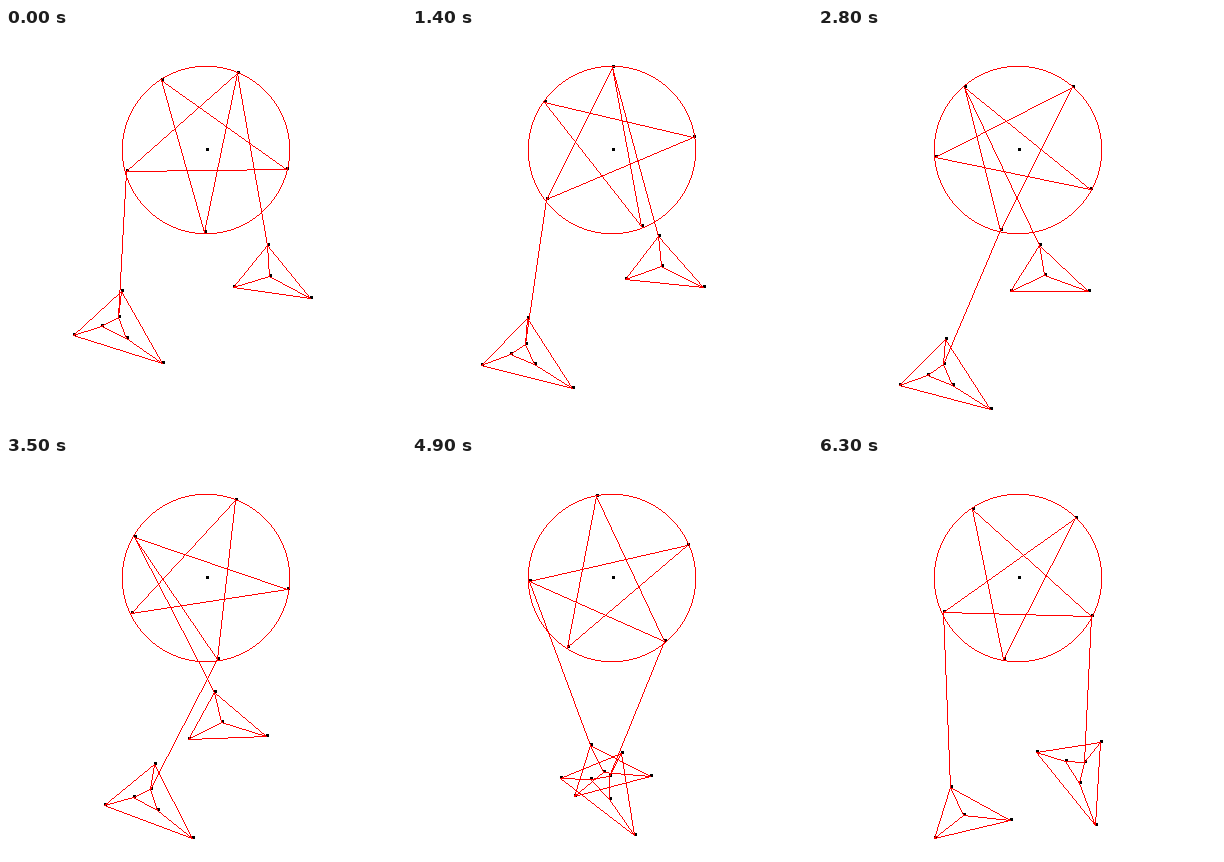
These frames come from a looping animation (400 px wide and 400 px high, 7000 ms). An HTML page with a canvas:

```html
<!DOCTYPE html>
<html>
<head>
<meta charset="utf-8">
<style>
  html, body { margin: 0; width: 100%; height: 100%; overflow: hidden; background: #fff; }
  canvas { display: block; }
</style>
</head>
<body>
<canvas id="stage" width="400" height="400"></canvas>
<script>
const ctx = document.getElementById('stage').getContext('2d');
const STEP_MS = 700, STEPS = 10;
const RELEASE = 4; // step at which the drive stops and everything moves freely
const hub = [199.5, 121.5], rim = 83.5, starRadius = 82.5;
const starOffsets = [0, 55.2, 127.4, 201.4, 278.6];

// Angles are in degrees, as functions of the step.
const growth = (base, size, rate) => k => base + size * Math.exp(rate * k);
const sway = (mean, size, speed, peak) => k => mean + size * Math.cos(speed * (k - peak));
const driven = (before, after) => k => (k < RELEASE ? before : after)(k);

// The wheel spins up, then friction slows it down.
const wheelAngle = driven(
  growth(40.7, 27, 0.3),
  k => 130.3 + 132.7 * (1 - Math.exp(-0.165 * (k - RELEASE)))
);

// Rigid frames hung from star points; points are relative to the hook (index 0).
// Swing is the arm's angle from straight down, tilt the turn of the frame.
const pendants = [
  {
    anchor: 0, arm: 175,
    points: [[0, 0], [42.6, 52.6], [-34.6, 41.5], [1.2, 30.7]],
    edges: ['01', '12', '20', '30', '31', '32'],
    swing: driven(growth(3.5, 6.55, 0.3), sway(0, 27.4, 0.374, 5.05)),
    tilt: driven(growth(1.2, -1.2, 0.53), sway(-16.5, -8.6, 0.8, 7.9))
  },
  {
    anchor: 2, arm: 145.8,
    points: [[0, 0], [2.8, -25.3], [44.5, 46.3], [-45, 18.5], [-16.3, 9.5], [8, 21]],
    edges: ['12', '23', '31', '01', '04', '05', '45', '34', '25'],
    swing: driven(growth(-0.6, -2.6, 0.53), sway(0, -27.7, 0.415, 5.45)),
    tilt: driven(growth(-5, 5, -0.5), sway(15.2, 19.2, 0.476, 9.7))
  }
];

const rad = degrees => degrees * Math.PI / 180;

function polar([x, y], radius, degrees) {
  const a = rad(degrees);
  return [x + radius * Math.cos(a), y - radius * Math.sin(a)];
}

function place([x, y], [ox, oy], degrees) {
  const c = Math.cos(rad(degrees)), s = Math.sin(rad(degrees));
  return [ox + x * c - y * s, oy + x * s + y * c];
}

const plot = (x, y) => ctx.fillRect(Math.round(x), Math.round(y), 1, 1);

// Pixel-stepped strokes keep the lines free of antialiasing.
function line(from, to) {
  const [x0, y0] = from.map(Math.round), [x1, y1] = to.map(Math.round);
  const count = Math.max(Math.abs(x1 - x0), Math.abs(y1 - y0), 1);
  for (let i = 0; i <= count; i++) {
    plot(x0 + (x1 - x0) * i / count, y0 + (y1 - y0) * i / count);
  }
}

// Centre and radius lie on half pixels.
function circle([cx, cy], r) {
  for (let i = 0.5; i <= r * Math.SQRT1_2; i++) {
    const j = Math.floor(Math.sqrt(r * r - i * i) + 0.5 - 0.5 * (r % 1)) + 0.5;
    for (const sx of [-1, 1]) {
      for (const sy of [-1, 1]) {
        plot(cx + sx * i, cy + sy * j);
        plot(cx + sx * j, cy + sy * i);
      }
    }
  }
}

// A dot sits with its lower left pixel on the point.
const dot = ([x, y]) => ctx.fillRect(Math.round(x), Math.round(y) - 2, 3, 3);

function draw(step) {
  const star = starOffsets.map(offset => polar(hub, starRadius, wheelAngle(step) + offset));
  const hanging = pendants.map(p => {
    const hook = polar(star[p.anchor], p.arm, p.swing(step) - 90);
    return p.points.map(point => place(point, hook, p.tilt(step)));
  });

  ctx.fillStyle = '#fff';
  ctx.fillRect(0, 0, 400, 400);

  ctx.fillStyle = '#000';
  [hub, ...star, ...hanging.flat()].forEach(dot);

  ctx.fillStyle = '#f00';
  circle(hub, rim);
  star.forEach((point, i) => line(point, star[(i + 2) % 5]));
  pendants.forEach((p, i) => {
    const points = hanging[i];
    line(star[p.anchor], points[0]);
    for (const [a, b] of p.edges) line(points[a], points[b]);
  });
}

const start = performance.now();
function tick() {
  const elapsed = performance.now() - start;
  draw(Math.floor(elapsed / STEP_MS) % STEPS);
  requestAnimationFrame(tick);
}
tick();
</script>
</body>
</html>
```
